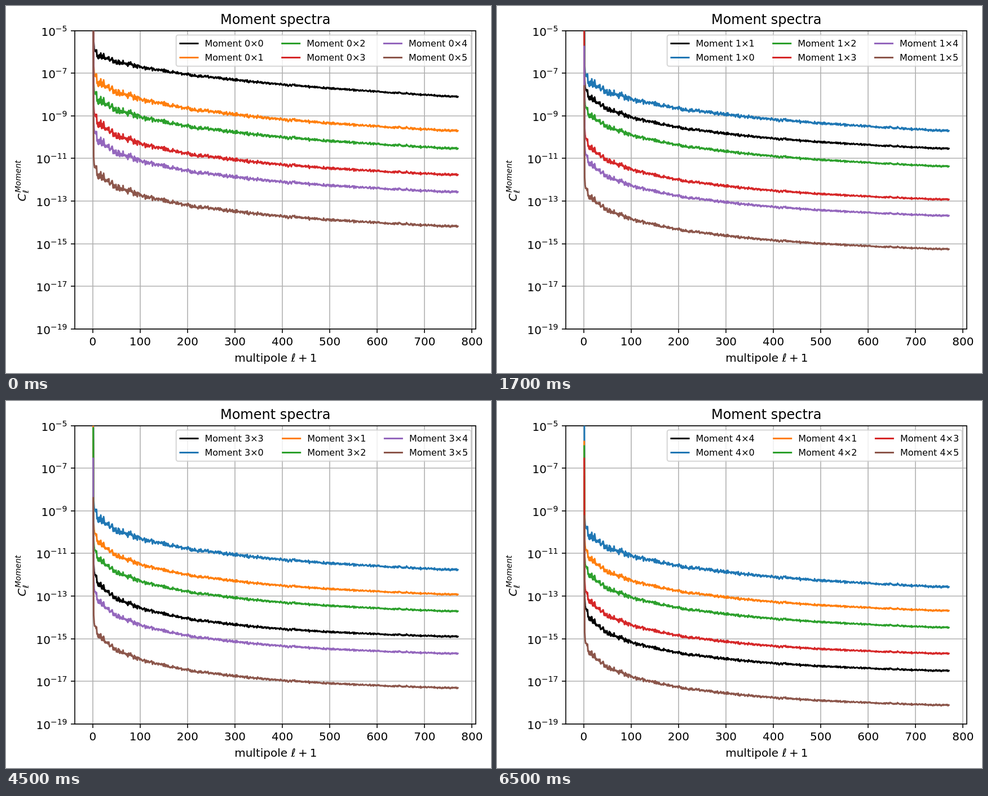
An HTML page that plays this animation: 860x651 px, repeating every 8000 ms.

```html
<!DOCTYPE html>
<html lang="en">
<head>
<meta charset="utf-8">
<title>Moment spectra</title>
<style>
html, body { margin: 0; width: 100%; height: 100%; overflow: hidden; background: #fff; }
svg { display: block; font-family: "DejaVu Sans", sans-serif; font-size: 20px; }
.curve { fill: none; stroke-width: 3; stroke-linejoin: round; stroke-linecap: square; }
.grid { stroke: #b0b0b0; stroke-width: 1.6; }
.axis { fill: none; stroke: #000; stroke-width: 1.6; }
.small { font-size: 14px; }
.legend { font-size: 16px; }
</style>
</head>
<body>
<svg id="stage" width="860" height="651" viewBox="0 0 860 651"></svg>
<script>
const LEFT = 122, RIGHT = 833, TOP = 44, BOTTOM = 573, MAX_L = 770, LOOP = 8000;
const COLORS = ['#1f77b4', '#ff7f0e', '#2ca02c', '#d62728', '#9467bd', '#8c564b'];

// Per moment: drop of the right end, height of the first spike, steepness class
const DEPTH = [0, 60.5, 92, 138.5, 169, 230];
const SPIKE = [-100, 5, 13, 35, 67, 137];
const STEEP = [0, 1, 1, 2, 2, 2];

const xAt = l => 153.8 + l * 0.8407;
const yAt = power => 43.7 - (power + 5) * 37.786;
const line = (x1, y1, x2, y2, cls) =>
  `<path class="${cls}" d="M${x1} ${y1}L${x2} ${y2}"/>`;
const text = (x, y, s, more = '') => `<text x="${x}" y="${y}" ${more}>${s}</text>`;

// One scatter shared by all spectra: roughly normal, one value per multipole
let seed = 41770913;
const random = () => (seed = (seed * 16807) % 2147483647) / 2147483647;
const scatter = Array.from({ length: MAX_L + 1 },
  () => (random() + random() + random() + random() - 2) * 1.73);

function endAt(i, j) {
  const lift = i === 0 ? 0 : j < 3 ? 29 : Math.min(20.5, 10 + 1.7 * (i + j));
  return 161.3 + DEPTH[i] + DEPTH[j] - lift;
}

// Softened power law over a constant floor, on a log scale
function heightAt(l, steep) {
  const soft = 100 / (1 + steep), signal = 1.42 * 0.78 ** steep;
  const u = (MAX_L + soft) / (l + soft);
  return 16.4 * Math.log(1 + signal * (u * u - 1)) + 80 / (l * l);
}

function curve(a, b, color) {
  const i = Math.min(a, b), j = Math.max(a, b);
  const end = endAt(i, j), noise = i === 0 && j > 0 ? 24 : 17;
  let d = `M${xAt(1)} ${SPIKE[i] + SPIKE[j]}`;
  for (let l = 2; l <= MAX_L; l++) {
    const wobble = scatter[l] * noise / Math.sqrt(l + 8);
    const y = end - heightAt(l, STEEP[i] + STEEP[j]) + wobble;
    d += `L${xAt(l).toFixed(2)} ${y.toFixed(2)}`;
  }
  return `<path class="curve" stroke="${color}" d="${d}"/>`;
}

function plot(n) {
  const order = [n, ...COLORS.keys()].filter((m, k) => k === 0 || m !== n);
  let curves = '', legend = '';
  order.forEach((m, k) => {
    const color = m === n ? '#000' : COLORS[m];
    const col = k >> 1, x = 309 + col * 180.7 + (col && n > col ? 1 : 0);
    const y = 66.5 + (k % 2) * 25;
    curves += curve(n, m, color);
    legend += `<path class="curve" stroke="${color}" d="M${x} ${y}h31"/>` +
      text(x + 43.5, y + 5.5, `Moment ${n}×${m}`);
  });
  return `<g class="plot"><g clip-path="url(#area)">${curves}</g>
    <g class="legend"><rect x="301.7" y="51.5" width="523" height="55.3" rx="3.5"
      fill="#fff" fill-opacity=".8" stroke="#ccc" stroke-opacity=".8" stroke-width="2"/>${legend}</g></g>`;
}

let grid = '', axes = '';
for (let l = 0; l <= 800; l += 100) {
  const x = Math.round(xAt(l));
  grid += line(x, TOP, x, BOTTOM, 'grid');
  axes += line(x, BOTTOM, x, BOTTOM + 7, 'axis') +
    text(xAt(l), 602, l, 'text-anchor="middle"');
}
for (let p = -5; p >= -19; p -= 2) {
  const y = Math.round(yAt(p));
  grid += line(LEFT, y, RIGHT, y, 'grid');
  axes += line(LEFT - 7, y, LEFT, y, 'axis') +
    text(108.5, y + 8.5, `10<tspan class="small" dy="-7.7">−${-p}</tspan>`, 'text-anchor="end"');
}
axes += `<rect class="axis" x="${LEFT}" y="${TOP}" width="${RIGHT - LEFT}" height="${BOTTOM - TOP}"/>` +
  text(477.7, 32, 'Moment spectra', 'text-anchor="middle" font-size="24"') +
  text(405.2, 631, 'multipole ℓ') + text(518, 631, '+') + text(538.7, 631, '1') +
  `<g transform="translate(35 346.5) rotate(-90)">
    ${text(0, 0, 'C', 'font-style="italic"')}
    ${text(15.5, -9, 'Moment', 'class="small" font-style="italic"')}
    ${text(14.5, 5.3, 'ℓ', 'class="small"')}
  </g>`;

const stage = document.getElementById('stage');
stage.innerHTML = `<clipPath id="area"><rect x="${LEFT}" y="${TOP}" width="${RIGHT - LEFT}"
  height="${BOTTOM - TOP}"/></clipPath>${grid}${axes}${[0, 1, 2, 3, 4].map(plot).join('')}`;
const plots = stage.querySelectorAll('.plot');

// Each plot holds for two seconds; the loop opens near the end of the first
function show() {
  const now = Math.floor((performance.now() % LOOP + 1500) / 2000);
  plots.forEach((p, n) => p.style.display = n === now ? '' : 'none');
  requestAnimationFrame(show);
}
show();
</script>
</body>
</html>
```
